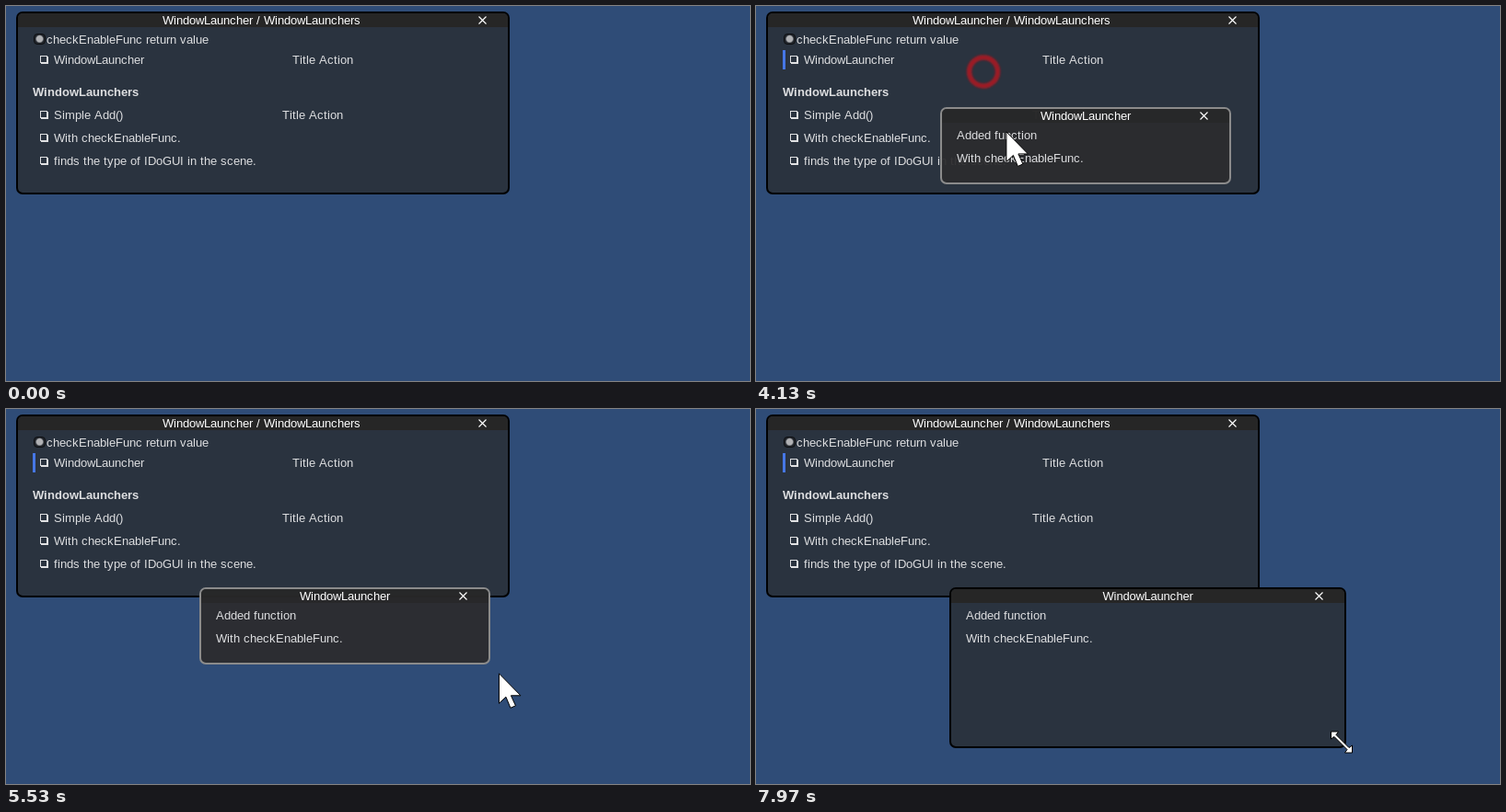
Write an HTML page that moves like this. It is 808 by 408 pixels and loops after 8 s.

```html
<!DOCTYPE html>
<html lang="en">
<head>
<meta charset="utf-8">
<title>WindowLauncher</title>
<style>
html, body { margin: 0; width: 100%; height: 100%; overflow: hidden; background: #2f4c77; }
#stage { position: relative; width: 808px; height: 408px; overflow: hidden;
  font: 13px/20px "Liberation Sans", Arial, sans-serif; font-kerning: none; color: #dddee0; white-space: pre; }
.win { position: absolute; box-sizing: border-box; border: 2px solid #000; border-radius: 7px;
  background: #2a333f; overflow: hidden; white-space: normal; }
.win.focus { border-color: #8b8b8b; background: rgba(44, 44, 46, .94); }
.bar { position: absolute; left: 0; right: 0; top: 0; height: 15px; background: #262626;
  color: #fff; line-height: 15px; text-align: center; white-space: pre; }
.focus .bar { background: rgba(38, 38, 38, .6); }
.close { position: absolute; right: 22px; top: 3px; width: 10px; height: 10px; }
.close path { stroke: #fff; stroke-width: 1.1; }
.text { position: absolute; white-space: pre; }
.row { position: absolute; left: 16px; height: 21px; white-space: pre; }
.row.hover { background: rgba(255, 255, 255, .2); }
.row.on::before { content: ""; position: absolute; left: 0; top: 0; width: 3px; height: 21px; background: #4677e6; }
.row > span { position: absolute; left: 23px; top: 1px; }
.row > i { position: absolute; left: 8px; top: 6px; width: 6px; height: 6px;
  border: 1px solid #dfe0e2; box-shadow: 1px 1px #dfe0e2; }
.radio { position: absolute; left: 17px; top: 22px; width: 11px; height: 10px; border: 1px solid #0c0d10;
  border-radius: 4px; background: radial-gradient(circle at 50% 48%, #b0b1b4 3.2px, #23272d 4.6px); }
#over { position: absolute; left: 0; top: 0; }
</style>
</head>
<body>
<div id="stage">
  <div class="win" id="main" style="left:11px;top:6px;width:536px;height:199px">
    <div class="bar" style="left:-3px">WindowLauncher / WindowLaunchers</div>
    <div class="radio"></div>
    <div class="text" style="left:31px;top:19px">checkEnableFunc return value</div>
    <div class="row" style="top:40px;width:278px"><i></i><span>WindowLauncher</span></div>
    <div class="text" style="left:298px;top:41px">Title Action</div>
    <div class="text" style="left:16px;top:76px"><b>WindowLaunchers</b></div>
    <div class="row" style="top:100px;width:267px"><i></i><span>Simple Add()</span></div>
    <div class="text" style="left:287px;top:101px">Title Action</div>
    <div class="row" style="top:125px;width:500px"><i></i><span>With checkEnableFunc.</span></div>
    <div class="row" style="top:150px;width:500px"><i></i><span>finds the type of IDoGUI in the scene.</span></div>
  </div>
  <div class="win" id="child">
    <div class="bar">WindowLauncher</div>
    <div class="text" style="left:16px;top:19px">Added function</div>
    <div class="text" style="left:16px;top:44px">With checkEnableFunc.</div>
  </div>
  <svg id="over" width="808" height="408" fill="none">
    <filter id="soft" x="-50%" y="-50%" width="200%" height="200%"><feGaussianBlur stdDeviation=".9"/></filter>
    <circle id="ring" stroke="#e01014" stroke-width="5.5" filter="url(#soft)"/>
    <path id="arrow" d="M.5 .5V33L8 26L13 38L18.500 35.500L13.500 24.500H24Z" fill="#fff" stroke="#000"/>
    <path id="sizer" d="M-11.500 -11.500H-3.500L-6 -8L8 6L11.500 3.500V11.500H3.500L6 8L-8 -6L-11.500 -3.500Z" fill="#fff" stroke="#000"/>
  </svg>
</div>
<script>
const LOOP = 8000, LAG = 33;
const PRESS = 2330, OPEN = 2500, GRAB = 3930, DROP = 5100, RESIZE = 6370;
const $ = id => document.getElementById(id);

// Key points of the pointer: time, x, y
const path = [
  [700, -26, 114], [1530, 141, 62],                                     // enter
  [3130, 141, 62], [3900, 248, 70],                                     // go to the title bar
  [4030, 241, 86], [4130, 271, 136], [4300, 356, 200], [4830, 281, 182], [5000, 268, 203], // drag
  [5150, 268, 203], [5600, 553, 293], [5700, 553, 293], [6130, 521, 272], // find the corner
  [6400, 521, 272], [6470, 526, 282], [7000, 642, 373.5], [7130, 647, 377], // grow
  [7230, 647, 377], [7500, 575, 318], [7970, 636, 362.5]                // shrink and return
];

// Smooth curve through the key points; it rests at turns and never overshoots.
const rate = (i, n) => (path[i + 1][n] - path[i][n]) / (path[i + 1][0] - path[i][0]);
function slope(i, n) {
  if (i === 0 || i === path.length - 1) return 0;
  const a = rate(i - 1, n), b = rate(i, n);
  return a * b > 0 ? 2 * a * b / (a + b) : 0;
}
function pointer(t) {
  t = Math.min(Math.max(t, path[0][0]), path[path.length - 1][0]);
  const i = Math.max(0, path.findIndex(p => p[0] >= t) - 1);
  const a = path[i], b = path[i + 1], span = b[0] - a[0], k = (t - a[0]) / span;
  const ease = k * k * (3 - 2 * k);
  return [1, 2].map(n => a[n] + (b[n] - a[n]) * ease
    + span * k * (1 - k) * ((1 - k) * slope(i, n) - k * slope(i + 1, n)));
}
const clicks = [PRESS, GRAB, RESIZE].map(at => [at, ...pointer(at)]);

// Whole-pixel letter advances, as in a bitmap font.
const pen = document.createElement("canvas").getContext("2d");
function snapLetters(node) {
  if (node.nodeType !== Node.TEXT_NODE) return [...node.childNodes].forEach(snapLetters);
  if (!node.data.trim()) return;
  const style = getComputedStyle(node.parentNode);
  pen.font = `${style.fontWeight} 13px ${style.fontFamily}`;
  node.replaceWith(...[...node.data].map(char => {
    const span = document.createElement("span");
    const width = pen.measureText(char).width;
    span.textContent = char;
    span.style.letterSpacing = Math.round(width) - width + "px";
    return span;
  }));
}

document.querySelectorAll(".win").forEach(win => {
  snapLetters(win);
  win.insertAdjacentHTML("beforeend",
    '<svg class="close"><path d="M.5 .5L8.500 8.500M8.500 .5L.5 8.500"/></svg>');
});

const rows = [...document.querySelectorAll(".row")].map(el => ({
  el, x: 13 + el.offsetLeft, y: 8 + el.offsetTop, w: el.offsetWidth, h: el.offsetHeight
}));

function placeChild(t, x, y) {
  const held = pointer(Math.min(Math.max(t - LAG, GRAB), DROP));
  const left = Math.round(held[0] - 58), top = Math.round(held[1] - 9);
  const sized = t > RESIZE;
  const child = $("child");
  Object.assign(child.style, {
    display: t < OPEN ? "none" : "block",
    left: left + "px",
    top: top + "px",
    width: (sized ? Math.round(x + 5 - left) : 316) + "px",
    height: (sized ? Math.round(y + 6 - top) : 84) + "px"
  });
  child.classList.toggle("focus", t >= GRAB && t < RESIZE);
}

function placeRing(t) {
  const click = clicks.find(c => t >= c[0] && t < c[0] + 330);
  const ring = $("ring");
  ring.style.display = click ? "" : "none";
  if (!click) return;
  const age = t - click[0];
  ring.setAttribute("cx", click[1]);
  ring.setAttribute("cy", click[2]);
  ring.setAttribute("r", age * .077);
  ring.setAttribute("opacity", 1 - (age / 330) ** 2);
}

function draw(t) {
  const [x, y] = pointer(t);
  const sizing = t > 5930;
  const free = t < OPEN || (t < GRAB && x < 190);
  rows.forEach(r => r.el.classList.toggle("hover",
    free && x >= r.x && x < r.x + r.w && y >= r.y && y < r.y + r.h));
  rows[0].el.classList.toggle("on", t >= OPEN);
  $("main").classList.toggle("focus", t >= PRESS && t < GRAB);
  placeChild(t, x, y);
  placeRing(t);
  $("arrow").style.display = sizing ? "none" : "";
  $("sizer").style.display = sizing ? "" : "none";
  $(sizing ? "sizer" : "arrow").setAttribute("transform", `translate(${x} ${y})`);
}

const start = performance.now();
function tick() {
  draw((performance.now() - start) % LOOP);
  requestAnimationFrame(tick);
}
tick();
</script>
</body>
</html>
```
